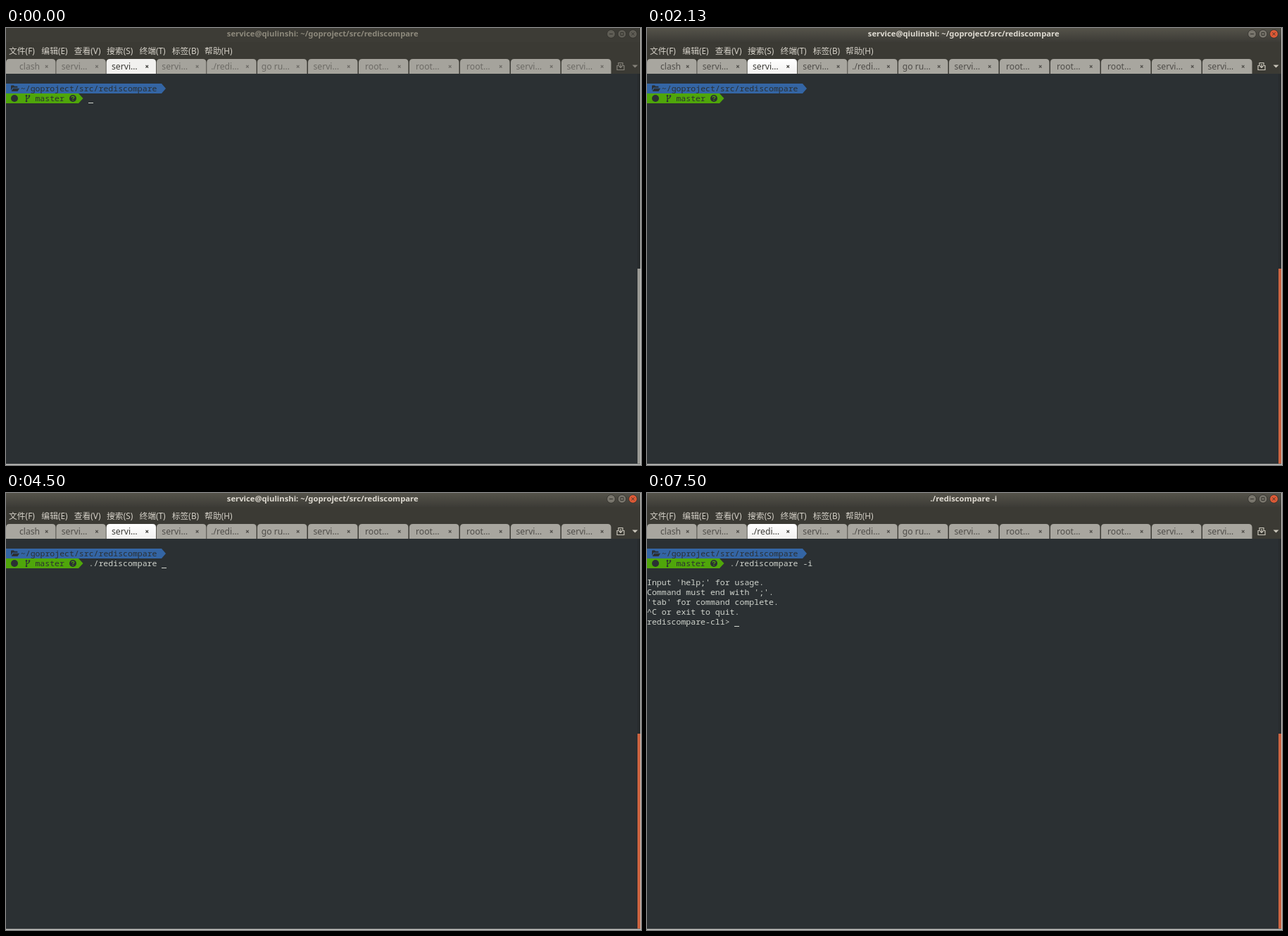
An HTML page that plays this animation: 902x621 px, repeating every 8000 ms.

```html
<!DOCTYPE html>
<html lang="zh">
<head>
<meta charset="utf-8">
<title>Terminal</title>
<style>
html, body { margin: 0; width: 100%; height: 100%; overflow: hidden; background: #2b3033; }
svg { display: block; width: 902px; height: 621px;
  --title: #8d897c; --tab: #a5a39c; --tabText: #6d6b66; --bar: #999994; --button: #5f5d55; --close: #5f5d55; --icon: #85827a;
  --titleBg: #3d3c36; --activeBg: #f2f1ef; }
svg.focused { --title: #dfdbd2; --tab: #a8a69f; --tabText: #4f4d49; --bar: #cc6340; --button: #78756c; --close: #de5a36; --icon: #c9c5ba;
  --titleBg: url(#titleShade); --activeBg: url(#tabShade); }
text { font-family: "Noto Sans", "Noto Sans CJK SC", "Noto Sans CJK", sans-serif; font-size: 12.2px; white-space: pre; }
.title { font-size: 11.25px; font-weight: 700; fill: var(--title); text-anchor: middle; }
.menu { font-size: 11.8px; fill: #d5d1c8; }
.tab { fill: var(--tabText); text-anchor: middle; }
.tab.active { fill: #3c3b37; }
.mono { font-family: "Noto Sans Mono", "DejaVu Sans Mono", monospace; font-size: 11.54px; fill: #d0d4cd; }
.dark { fill: #2b3033; }
.line { fill: none; stroke: #2b3033; stroke-width: 1.2; }
</style>
</head>
<body>
<svg id="stage" viewBox="0 0 902 621">
  <defs>
    <linearGradient id="titleShade" x2="0" y2="1"><stop stop-color="#55534a"/><stop offset="1" stop-color="#3c3b36"/></linearGradient>
    <linearGradient id="tabShade" x2="0" y2="1"><stop stop-color="#fff"/><stop offset="1" stop-color="#f2f1f0"/></linearGradient>
  </defs>

  <rect width="902" height="66" fill="#3b3a34"/>
  <rect width="902" height="20" fill="var(--titleBg)"/>
  <text id="title" class="title" x="449.7" y="12.4"></text>

  <g stroke="#33322d" stroke-width=".9">
    <circle cx="859.5" cy="8.4" r="5.9" fill="var(--button)"/>
    <circle cx="875" cy="8.4" r="5.9" fill="var(--button)"/>
    <circle cx="890.5" cy="8.4" r="5.9" fill="var(--close)"/>
    <path d="M857 8.5h5M873 6.4h4v4h-4zM888.5 6.4l4 4m0-4l-4 4" fill="none" stroke-width="1"/>
  </g>

  <g id="menus"></g>
  <g id="tabs"></g>
  <path d="M870 53.5h-2v6h10v-6h-2M870 54v-4.5h6V54M873 51v5m-2.3-2l2.3 2.3l2.3-2.3" fill="none" stroke="var(--icon)" stroke-width="1.2"/>
  <path d="M889.5 52.5h8l-4 4z" fill="var(--icon)"/>

  <rect y="65" width="902" height="556" fill="#2b3033"/>
  <rect x="897" y="65" width="4" height="277" fill="#272b2d"/>
  <rect x="897" y="342" width="4" height="277" fill="var(--bar)"/>
  <path d="M0 619.5H901V0h1V621H0z" fill="#c4c4c1"/>

  <path d="M0 79h221l6 7l-6 7H0z" fill="#3465a4"/>
  <path d="M0 93h103l6.5 7l-6.5 7H0z" fill="#4fa60a"/>
  <path class="dark" d="M7 89V82.5q0-1 1-1h3l1 1.3h3.5q1 0 1 1v1H9.3zM7.7 90l2.4-4.3h9L16.5 90z"/>
  <text class="mono dark" x="20.8" y="89.7">~/goproject/src/rediscompare</text>
  <circle class="dark" cx="12" cy="100" r="5"/>
  <path class="line" d="M29 96v8.2M33 96.3v1.3q0 2-2 2.4t-2 2"/>
  <circle class="dark" cx="29" cy="96.2" r="1.3"/>
  <circle class="dark" cx="29" cy="104" r="1.3"/>
  <circle class="dark" cx="33" cy="96.5" r="1.3"/>
  <text class="mono dark" x="41.4" y="103.6">master</text>
  <circle class="dark" cx="95" cy="100" r="5"/>
  <path d="M93.2 98.7q0-1.6 1.8-1.6t1.8 1.4q0 .8-1 1.3t-.8 1.2M95 102v1.2" fill="none" stroke="#4fa60a" stroke-width="1.2"/>

  <text id="command" class="mono" x="117.6" y="103.6"></text>
  <g id="output"></g>
  <rect id="cursor" width="7" height="1" fill="#d3d7cf"/>
  <path id="pointer" d="M-2.5-5.5H-.7L0-5L.7-5.5H2.5M0-5V5M-2.5 5.5H-.7L0 5L.7 5.5H2.5" fill="none" stroke="#c3c6c5" stroke-width=".9"/>
</svg>
<script>
const LOOP = 8000, CELL = 6.925, ROW = 13.85;
const TITLE = 'service@qiulinshi: ~/goproject/src/rediscompare';
const byId = id => document.getElementById(id);

function add(parent, tag, attrs, text = '') {
  const node = document.createElementNS('http://www.w3.org/2000/svg', tag);
  for (const key in attrs) node.setAttribute(key, attrs[key]);
  node.textContent = text;
  return byId(parent).appendChild(node);
}

['文件(F)', '编辑(E)', '查看(V)', '搜索(S)', '终端(T)', '标签(B)', '帮助(H)'].forEach((label, i) =>
  add('menus', 'text', { class: 'menu', x: 4 + i * 46.35, y: 37.2 }, label));

const tabLabels = ['clash', 'servi…', 'servi…', 'servi…', './redi…', 'go ru…', 'servi…',
  'root…', 'root…', 'root…', 'servi…', 'servi…'].map((label, i) => {
  const x = Math.max(71.3 * i, 72 * i - 3), active = i === 2;
  add('tabs', 'path', {
    d: `M${x} 65V49q0-5 5-5h60.5q5 0 5 5v16z`,
    fill: active ? 'var(--activeBg)' : 'var(--tab)'
  });
  const style = active ? 'tab active' : 'tab';
  const node = add('tabs', 'text', { class: style, x: i ? x + 25.8 : 33.5, y: 59.3 }, label);
  add('tabs', 'path', {
    d: `M${x + 55.9} 52.9l3.6 3.6m0-3.6l-3.6 3.6`, fill: 'none', 'stroke-width': 1.1,
    stroke: active ? '#3c3b37' : 'var(--tabText)'
  });
  return node;
});

["Input 'help;' for usage.", "Command must end with ';'.", "'tab' for command complete.",
  '^C or exit to quit.', 'rediscompare-cli> '].forEach((line, i) =>
  add('output', 'text', { class: 'mono', x: 0, y: 103.6 + (i + 2) * ROW }, line));

// [start time, typed command, cursor visible]
const typing = [
  [0, '', true], [2130, '', false], [2750, '', true], [2880, '.', true], [3000, './', true],
  [3500, './r', true], [3630, './re', true], [4130, './red', true], [4380, './redi', true],
  [4500, './rediscompare ', true], [5130, './rediscompare ', false], [5630, './rediscompare ', true],
  [5750, './rediscompare -', true], [6380, './rediscompare -i', true],
  [6750, './rediscompare -i', false], [7500, './rediscompare -i', true]
];
// [start time, x, y]; off stage when hidden
const pointerPath = [[0, -50, 0], [630, 655, 114.5], [880, 498.5, 118.5], [1380, -50, 0]];
const at = (steps, time) => steps.findLast(step => step[0] <= time);

function draw(time) {
  const running = time >= 7500;
  const [, command, cursorOn] = at(typing, time);
  const [, px, py] = at(pointerPath, time);

  byId('stage').classList.toggle('focused', time >= 1000);
  byId('title').textContent = running ? './rediscompare -i' : TITLE;
  tabLabels[2].textContent = running ? './redi…' : 'servi…';
  byId('command').textContent = command;
  byId('output').style.display = running ? '' : 'none';
  byId('pointer').setAttribute('transform', `translate(${px} ${py})`);

  const cursor = byId('cursor');
  const column = running ? 18 : 17 + command.length;
  cursor.style.display = cursorOn ? '' : 'none';
  cursor.setAttribute('x', Math.floor(column * CELL));
  cursor.setAttribute('y', running ? 189 : 106);
}

const start = performance.now();
function tick() {
  draw((performance.now() - start) % LOOP);
  requestAnimationFrame(tick);
}
tick();
</script>
</body>
</html>
```
